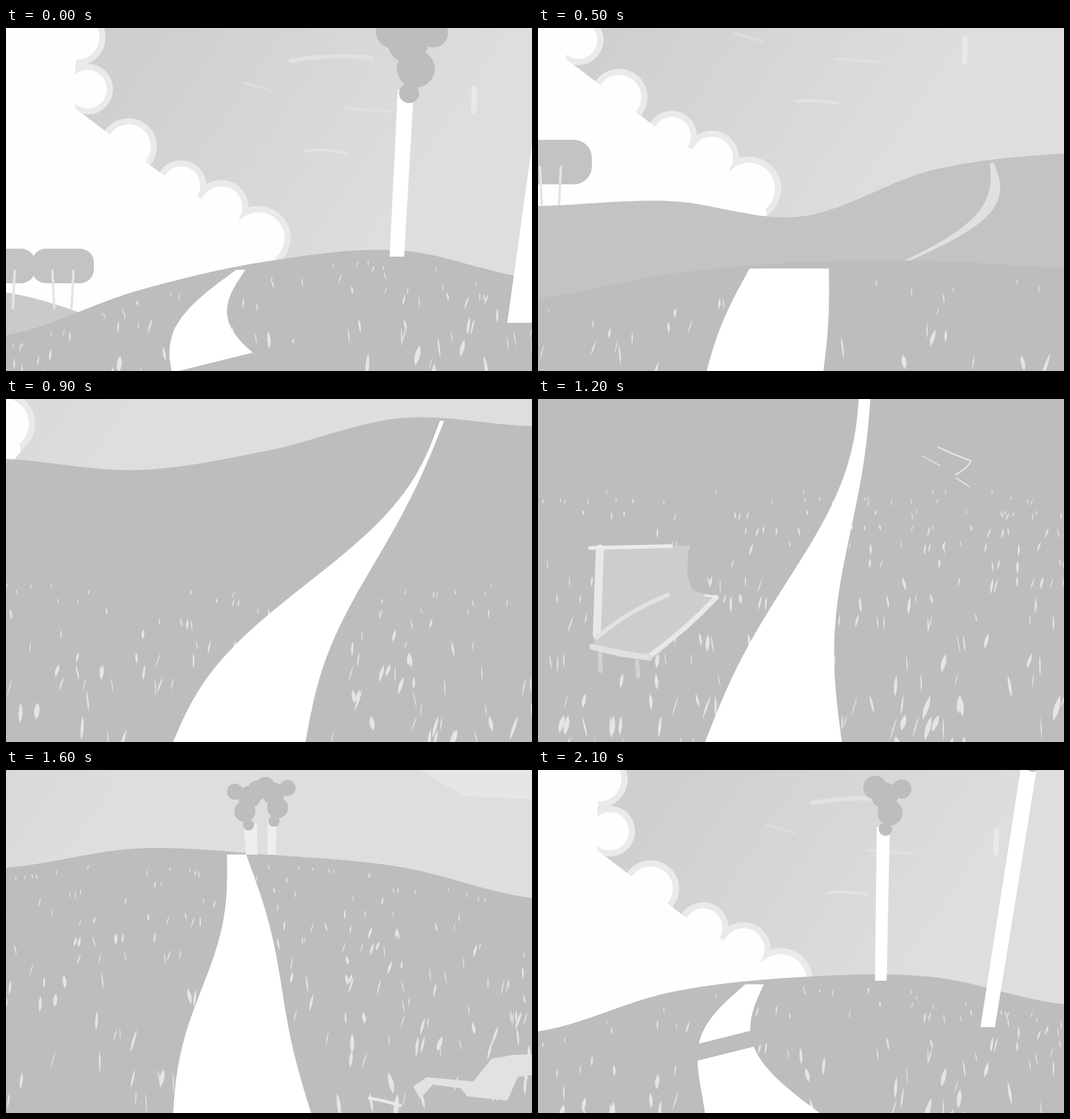
Write an HTML page with a canvas that moves like this. It is 850 px wide and 555 px high and loops after 2.2 s.

```html
<!DOCTYPE html>
<html>
<head>
<meta charset="utf-8">
<style>
html, body { margin: 0; width: 100%; height: 100%; overflow: hidden; background: #bdbdbd; }
canvas { display: block; }
</style>
</head>
<body>
<canvas id="stage" width="850" height="555"></canvas>
<script>
const W = 850, H = 555, LOOP = 2200, STEP = 100, GROUND = 189;
const ctx = document.getElementById('stage').getContext('2d');
const grey = v => `rgb(${v},${v},${v})`;

// A track is a list of [time, ...values]; values are blended linearly.
function at(track, t) {
  let i = 0;
  while (i < track.length - 2 && t > track[i + 1][0]) i++;
  const a = track[i], b = track[i + 1];
  const k = Math.min(1, Math.max(0, (t - a[0]) / (b[0] - a[0])));
  return a.slice(1).map((v, j) => v + (b[j + 1] - v) * k);
}

function shape(pts, color) {
  ctx.beginPath();
  pts.forEach(p => ctx.lineTo(...p));
  ctx.fillStyle = color;
  ctx.fill();
}
function discs(list, color, grow = 0) {
  ctx.fillStyle = color;
  for (const [x, y, r] of list) {
    ctx.beginPath();
    ctx.arc(x, y, r + grow, 0, 7);
    ctx.fill();
  }
}
function stroke(x1, y1, x2, y2, width, color, bend = 0) {
  ctx.beginPath();
  ctx.moveTo(x1, y1);
  ctx.quadraticCurveTo((x1 + x2) / 2 + bend, (y1 + y2) / 2 + bend, x2, y2);
  ctx.lineWidth = width;
  ctx.strokeStyle = grey(color);
  ctx.stroke();
}
function zoom(s, x, y, draw) {
  ctx.save();
  ctx.translate(x, y);
  ctx.scale(s, s);
  ctx.translate(-x, -y);
  draw();
  ctx.restore();
}

// Each hill rises in the distance, is ridden over, and sinks below the next one.
// Heights of the crest at five even steps across the stage:
const crestTrack = [
  [0, 428, 490, 540, 560, 560],
  [300, 333, 328, 396, 357, 262],
  [500, 288, 280, 305, 230, 203],
  [900, 97, 115, 83, 31, 44],
  [1200, -60, -60, -60, -60, -60],
  [1600, 158, 127, 137, 157, 207],
  [2100, 423, 360, 335, 335, 379],
  [2200, 497, 425, 377, 360, 405],
  [2500, 521, 428, 381, 383, 430],
  [2700, 437, 398, 379, 377, 388],
  [3100, 660, 630, 610, 607, 618]
];
// Road: x of left and right edge at the crest, right edge at the bottom,
// then single and double bend of the left and of the right edge.
const roadTrack = [
  [300, 833, 842, 460, 160, 15, 88, 0],
  [500, 730, 737, 460, 70, 43, -20, 74],
  [900, 701, 708, 484, 5, 36, -18, 12],
  [1200, 520, 540, 491, 36, 20, -18, 12],
  [1600, 357, 388, 493, 6, 12, 4, 6],
  [2100, 335, 365, 455, -44, -6, -60, 0],
  [2200, 372, 387, 455, -44, 0, -60, 0],
  [2500, 412, 468, 451, -42, -8, -26, -8],
  [2700, 342, 470, 460, -8, 0, 4, 0]
];
const hillTone = [[0, 202], [300, 200], [500, 195], [800, GROUND]];
const roadTone = [[300, 210], [500, 224], [800, 255]];
const shadowTrack = [[1900, 300, 3], [2100, 444, 27], [2200, 561, 80], [2300, 760, 90]];

function crestAt(h, x) {
  const c = Math.min(3.999, Math.max(0, x / W * 4)), i = Math.floor(c), k = c - i;
  const b = h[i], d = h[i + 1], a = h[i - 1] ?? b, e = h[i + 2] ?? d;
  return b + k * ((d - a) + k * ((2 * a - 5 * b + 4 * d - e) + k * (3 * b - 3 * d + e - a))) / 2;
}

let seed = 7;
const random = () => (seed = (seed * 16807) % 2147483647) / 2147483647;
const ROWS = 14;
const blades = Array.from({ length: 280 }, () => [0, 0, 0, 0, 0].map(random));
const bladeCount = [[700, 0], [900, 150], [1200, 280], [1600, 260], [2100, 130], [2200, 110], [2500, 45]];
const bladeTop = [[900, 300], [1200, 150]];

function grass(age, crest) {
  const top = age < 1600 ? at(bladeTop, age)[0] : 0;
  ctx.fillStyle = grey(229);
  blades.slice(0, at(bladeCount, age)[0]).forEach(([across, depth, size, fat, tilt]) => {
    const row = (Math.floor(depth * ROWS) + .4 * size) / ROWS;
    const u = (row + age / 900) % 1;
    const x = W / 2 + (across - .5) * W * (1 + .5 * u);
    const y0 = Math.max(top, crestAt(crest, x) + 18);
    const y = y0 + (570 - y0) * u ** 1.2;
    const len = (9 + 34 * u) * (.6 + .5 * size), lean = (tilt - .4) * len * .6;
    const bulge = (1.2 + 9 * u * fat ** 2) * (tilt < .5 ? 1 : -1);
    ctx.beginPath();
    ctx.moveTo(x - lean / 2, y + len / 2);
    ctx.quadraticCurveTo(x - bulge, y, x + lean / 2, y - len / 2);
    ctx.quadraticCurveTo(x + bulge + Math.sign(bulge), y, x - lean / 2, y + len / 2);
    ctx.fill();
  });
}

function road(age, crest) {
  const [left, right, foot, l1, l2, r1, r2] = at(roadTrack, age);
  const top = crestAt(crest, left) + 5, bottom = Math.max(H, top + 175);
  const edge = (from, to, one, two) => Array.from({ length: 31 }, (_, i) => {
    const v = i / 30;
    return [from + (to - from) * v + one * Math.sin(Math.PI * v) + two * Math.sin(2 * Math.PI * v),
      top + (bottom - top) * v];
  });
  shape([...edge(left, 270, l1, l2), ...edge(right, foot, r1, r2).reverse()], grey(at(roadTone, age)[0]));
}

function hill(age) {
  const crest = at(crestTrack, age);
  const outline = [[0, 700]];
  for (let x = 0; x <= W; x += 10) outline.push([x, crestAt(crest, x)]);
  ctx.save();
  shape([...outline, [W, 700]], grey(at(hillTone, age)[0]));
  ctx.clip();
  if (age > 700) grass(age, crest);
  road(age, crest);
  if (age >= 1900 && age < 2400) {
    const [y, thick] = at(shadowTrack, age);
    shape([[255, y], [480, y - 56], [480, y + thick - 56], [255, y + thick]], grey(GROUND));
  }
  ctx.restore();
}

// Tree: foot x, y; trunk top x, y; trunk width; leaf size.
const leftTree = [
  [1200, 398, -60, 399, -110, 20, 1],
  [1600, 398, 137, 395, 86, 21, 1],
  [2100, 555, 341, 558, 92, 21, 1.2],
  [2200, 633, 370, 646, 100, 26, 1.8],
  [2500, 860, 640, 935, -40, 150, 4]
];
const rightTree = [
  [1200, 430, -60, 430, -120, 15, 1],
  [1600, 430, 137, 430, 80, 15, 1],
  [2100, 728, 416, 795, -15, 26, 1.5],
  [2200, 850, 477, 908, 60, 80, 2],
  [2300, 1090, 560, 1150, 0, 120, 3]
];
const leaves = [[3, 3, 9], [9, -19, 17], [2, -42, 18], [25, -51, 13], [-11, -53, 16]];

function tree(track, age, side) {
  const [x, y, topX, topY, width, size] = at(track, age), r = width / 2;
  shape([[topX - r, topY], [topX + r, topY], [x + r * .8, y], [x - r, y]], grey(age < 1800 ? 238 : 255));
  discs(leaves.map(([dx, dy, s]) => [topX + side * dx * size, topY + dy * size, s * size]), grey(GROUND));
}
function trees(age) {
  if (age < 1300 || age > 2550) return;
  tree(rightTree, age, 1);
  tree(leftTree, age, age < 1900 ? -1 : 1);
}

// Two clumps on the distant hill: centre x, y and half size.
const groveTrack = [[0, 92, 385, 50, 28], [300, 135, 250, 57, 27], [500, 20, 217, 67, 36], [700, -200, 140, 80, 50]];
function grove(age) {
  if (age > 700) return;
  const [x, y, rx, ry] = at(groveTrack, age);
  for (const cx of [x - 1.9 * rx, x]) {
    ctx.fillStyle = grey(195);
    ctx.beginPath();
    ctx.roundRect(cx - rx, y - ry, 2 * rx, 2 * ry, ry * .8);
    ctx.fill();
    for (const side of [-1, 1]) stroke(cx + side * 17, y + 8, cx + side * 14, y + 68, 4, 228);
  }
}

function bench() {
  shape([[106, 240], [243, 237], [241, 285], [250, 310], [290, 320], [190, 418], [130, 418], [90, 395]], grey(205));
  stroke(100, 405, 101, 440, 7, 210);
  stroke(160, 425, 162, 448, 7, 210);
  stroke(100, 242, 95, 382, 13, 232);
  stroke(84, 241, 215, 238, 6, 236);
  stroke(95, 386, 210, 317, 7, 226, -8);
  stroke(270, 318, 290, 320, 4, 234);
  stroke(288, 321, 180, 416, 8, 232, 5);
  stroke(88, 401, 180, 418, 10, 224, 5);
}
function scribble() {
  stroke(647, 78, 700, 100, 2, 232, 3);
  stroke(700, 100, 675, 122, 2, 232, 4);
  stroke(676, 128, 697, 142, 2, 232);
  stroke(621, 92, 650, 108, 1.5, 225);
}
function animal() {
  shape([[658, 512], [680, 497], [755, 504], [785, 467], [820, 461], [852, 460], [852, 493],
    [827, 497], [810, 535], [745, 528], [735, 515], [690, 509], [669, 532]], grey(226));
  stroke(587, 531, 637, 543, 5, 232, -3);
}
// Things beside the road grow away from a point on the horizon.
function passing(t, middle, reach, rate, x, y, draw) {
  const steps = (t - middle) / STEP;
  if (Math.abs(steps) <= reach) zoom(rate ** steps, x, y, draw);
}

const skyTrack = [[0, 0, 0], [300, 0, -40], [500, -67, -80], [900, -413, -300],
  [1200, -600, -420], [1600, -480, -220], [2100, -16, 0], [2200, 0, 0]];
const puffs = [[115, 15, 40], [132, 99, 35], [198, 192, 40], [283, 255, 35], [348, 290, 38], [408, 340, 46]];
const cloudBody = [[-800, -300], [140, -300], [112, 70], [112, 130], [270, 250], [430, 340],
  [437, 385], [360, 480], [200, 700], [-800, 700]];

function sky(t) {
  const [dx, dy] = at(skyTrack, t);
  ctx.save();
  ctx.translate(dx, dy);
  const tone = ctx.createLinearGradient(200, 60, 620, 340);
  tone.addColorStop(0, grey(207));
  tone.addColorStop(1, grey(222));
  ctx.fillStyle = tone;
  ctx.fillRect(-dx, -dy, W, H);
  stroke(460, 53, 590, 48, 7, 225, -8);
  stroke(385, 88, 430, 102, 4, 220);
  stroke(550, 130, 620, 135, 5, 224);
  stroke(485, 199, 550, 202, 5, 226, -6);
  stroke(757, 98, 756, 134, 9, 232);
  shape([[1140, 215], [1340, 215], [1340, 268], [1220, 262]], grey(230));
  discs(puffs, grey(234), 6);
  shape(cloudBody, '#fefefe');
  discs(puffs, '#fefefe', -4);
  ctx.restore();
}

function frame(now) {
  const t = Math.floor(now % LOOP / STEP) * STEP;
  sky(t);
  hill(t);
  grove(t);
  passing(t, 1200, 2, 1.6, 470, 0, bench);
  passing(t, 1200, 1, 1.3, 500, 0, scribble);
  passing(t, 1600, 2, 1.5, 500, 100, animal);
  trees(t);
  if (t < 900) {
    hill(t + LOOP);
    trees(t + LOOP);
  }
  requestAnimationFrame(frame);
}
ctx.lineCap = ctx.lineJoin = 'round';
requestAnimationFrame(frame);
</script>
</body>
</html>
```
